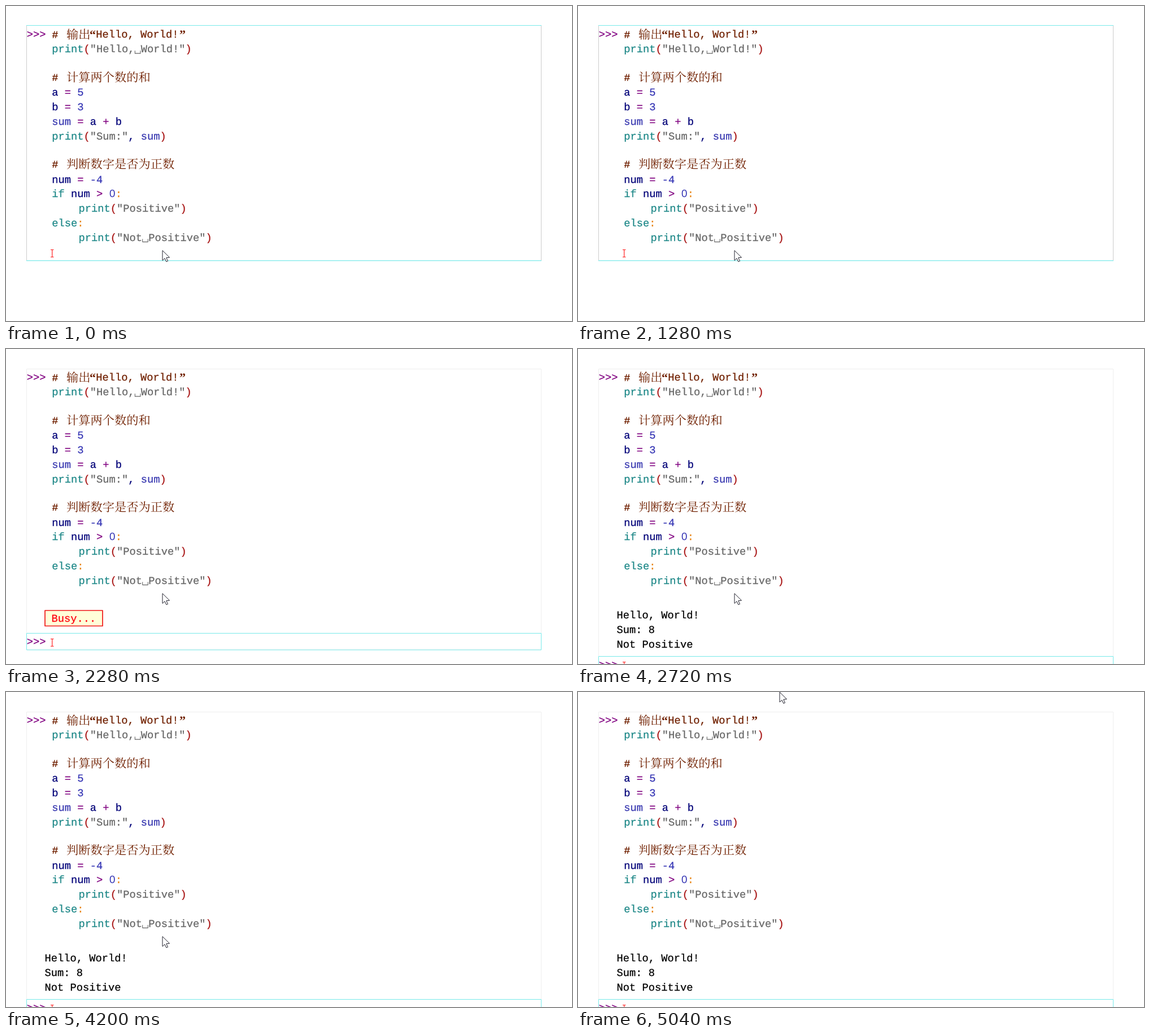
An HTML page with a canvas that plays this animation: 1002 px wide and 559 px high, repeating every 5.08 s.

```html
<!DOCTYPE html>
<html lang="zh">
<head>
<meta charset="utf-8">
<style>
  html, body { margin: 0; width: 100%; height: 100%; overflow: hidden; background: #fff; }
  canvas { display: block; width: 1002px; height: 559px; }
</style>
</head>
<body>
<canvas id="stage"></canvas>
<script>
const LOOP = 5080, BUSY_AT = 1380, DONE_AT = 2500, MOVE_AT = 4680, MOVE_END = 5040;
const SIZE = 18.75, PITCH = SIZE * 0.6, ROW = 25.73, TOP = 56.4, LEFT = 81.3, INDENT = 128.4;
const MONO = '"Liberation Mono", "Courier New", monospace';
const SANS = '"Liberation Sans", Arial, sans-serif';
const SERIF = '"Liberation Serif", "Times New Roman", serif';
const HAN = '"Noto Serif CJK SC", "Noto Sans CJK SC", "Noto Sans CJK", serif';
const CYAN = '#78eaea', FAINT = '#eeeeee', BROWN = '#702000', PURPLE = '#800080';

const canvas = document.getElementById('stage');
const ctx = canvas.getContext('2d');
const dpr = window.devicePixelRatio || 1;
canvas.width = 1002 * dpr;
canvas.height = 559 * dpr;

// Order decides which rule wins.
const RULES = [
  [/^"[^"]*"/, '#666666'],
  [/^(print|if|else)\b/, '#1c8787'],
  [/^sum\b/, '#3838b0'],
  [/^-?\d+/, '#3434b4'],
  [/^[a-z]+/, '#000078'],
  [/^[()]/, '#a81414'],
  [/^[=+>]/, PURPLE],
  [/^:/, '#e88414'],
  [/^,/, '#000078'],
  [/^\s+/, '#000000']
];

// Row, left edge, source.
const CODE = [
  [1, LEFT, 'print("Hello,␣World!")'],
  [4, LEFT, 'a = 5'],
  [5, LEFT, 'b = 3'],
  [6, LEFT, 'sum = a + b'],
  [7, LEFT, 'print("Sum:", sum)'],
  [10, LEFT, 'num = -4'],
  [11, LEFT, 'if num > 0:'],
  [12, INDENT, 'print("Positive")'],
  [13, LEFT, 'else:'],
  [14, INDENT, 'print("Not␣Positive")']
];

function text(str, x, y, color, font = `${SIZE}px ${MONO}`) {
  ctx.font = font;
  ctx.fillStyle = color;
  ctx.fillText(str, x, y);
}

// Monospaced text, thickened slightly.
function mono(str, x, y, color) {
  text(str, x, y, color);
  ctx.strokeStyle = color;
  ctx.lineWidth = 0.25;
  ctx.strokeText(str, x, y);
}

function line(points, color, width = 1) {
  ctx.beginPath();
  points.forEach(([x, y]) => ctx.lineTo(x, y));
  ctx.strokeStyle = color;
  ctx.lineWidth = width;
  ctx.stroke();
}

function spaceMark(x, y, color) {
  line([[x + 0.8, y - 3], [x + 0.8, y + 2], [x + 10.4, y + 2], [x + 10.4, y - 3]], color, 1.1);
}

function token(str, x, y, color) {
  if (str === '0') return text(str, x + 0.5, y, color, `${SIZE}px ${SANS}`);
  const gap = str.indexOf('␣');
  mono(str.replace('␣', ' '), x, y, color);
  if (gap >= 0) spaceMark(x + gap * PITCH, y, color);
}

function codeLine([row, x, src]) {
  while (src) {
    const [rule, color] = RULES.find(([r]) => r.test(src));
    const part = src.match(rule)[0];
    token(part, x, TOP + row * ROW, color);
    x += part.length * PITCH;
    src = src.slice(part.length);
  }
}

function comment(y, han) {
  text('#', LEFT, y, BROWN, `bold ${SIZE}px ${MONO}`);
  text(han, 107, y + 1, BROWN, `300 21.25px ${HAN}`);
}

function listing() {
  const quote = `bold 22px ${SERIF}`;
  comment(56.5, '输出');
  text('“', 148, 58, BROWN, quote);
  mono('Hello, World!', 159.2, TOP, BROWN);
  text('”', 307, 58, BROWN, quote);
  comment(132.5, '计算两个数的和');
  comment(287, '判断数字是否为正数');
  CODE.forEach(codeLine);
}

function prompt(y) {
  mono('>>>', 36.7, y, PURPLE);
}

function caret(y) {
  line([[79, y + 0.5], [84.5, y + 0.5]], '#ff2020');
  line([[79, y + 13.5], [84.5, y + 13.5]], '#ff2020');
  line([[81.75, y], [81.75, y + 14]], '#ff2020', 1.2);
}

function box(top, bottom, color) {
  ctx.strokeStyle = color;
  ctx.lineWidth = 1;
  ctx.strokeRect(36.5, top, 911, bottom - top);
}

function input(top) {
  box(top, top + 29.5, CYAN);
  prompt(top + 20.5);
  caret(top + 9.5);
}

function editing() {
  line([[36.5, 34.5], [36.5, 452]], '#cccccc');
  line([[947.5, 34.5], [947.5, 452]], '#cccccc');
  line([[36, 34.5], [948, 34.5]], CYAN);
  line([[36, 451.8], [948, 451.8]], CYAN, 1.2);
  caret(432);
}

function busy() {
  box(35.5, 533, FAINT);
  ctx.fillStyle = '#ffffd8';
  ctx.fillRect(69, 464, 102, 27.5);
  ctx.strokeStyle = '#f01818';
  ctx.lineWidth = 1.7;
  ctx.strokeRect(69, 464, 102, 27.5);
  mono('Busy...', 80.5, 484, '#ff0010');
  input(504.5);
}

function output() {
  box(35.5, 575, FAINT);
  ['Hello, World!', 'Sum: 8', 'Not Positive'].forEach((s, i) =>
    mono(s, 68.5, 478.2 + i * ROW, '#000000'));
  input(545.5);
}

function pointer(t) {
  const p = Math.min(1, Math.max(0, (t - MOVE_AT) / (MOVE_END - MOVE_AT)));
  const e = p * p * (3 - 2 * p);
  ctx.save();
  ctx.translate(276.5 + 80 * e, 433 - 433.5 * e);
  ctx.beginPath();
  [[0.5, 0.8], [0.5, 18.5], [4.5, 14.8], [7.4, 20.8], [10, 19.6],
   [7.3, 13.7], [13, 13.2]].forEach(([x, y]) => ctx.lineTo(x, y));
  ctx.closePath();
  ctx.fillStyle = '#ffffff';
  ctx.fill();
  ctx.strokeStyle = '#20202c';
  ctx.lineWidth = 1;
  ctx.stroke();
  ctx.restore();
}

function draw(now) {
  const t = now % LOOP;
  ctx.setTransform(dpr, 0, 0, dpr, 0, 0);
  ctx.textRendering = 'geometricPrecision';
  ctx.lineJoin = 'round';
  ctx.fillStyle = '#ffffff';
  ctx.fillRect(0, 0, 1002, 559);
  if (t < BUSY_AT) editing();
  else if (t < DONE_AT) busy();
  else output();
  prompt(56);
  listing();
  pointer(t);
}

const start = performance.now();
function frame() {
  draw(performance.now() - start);
  requestAnimationFrame(frame);
}
frame();
</script>
</body>
</html>
```
